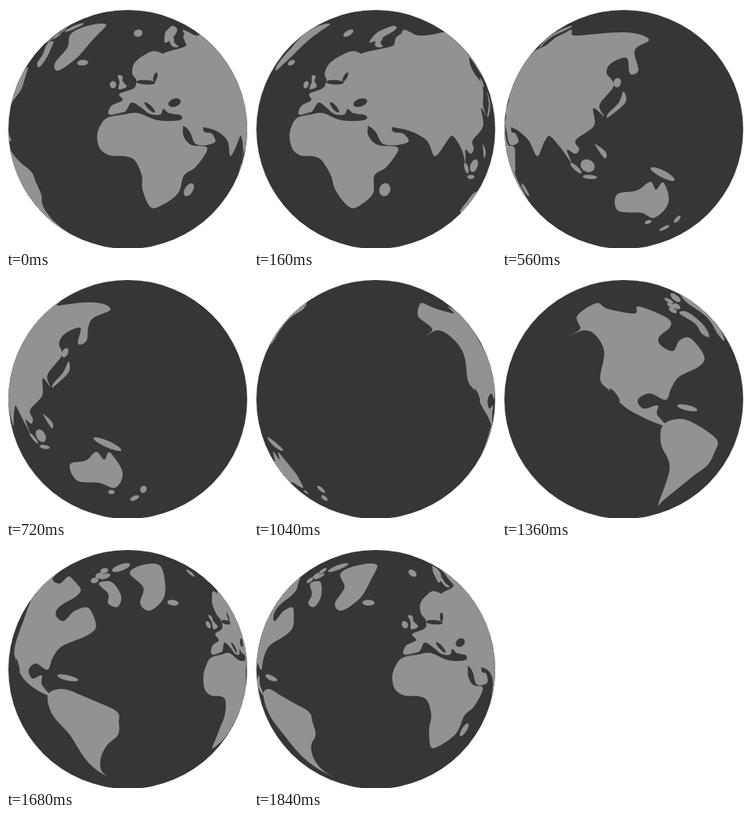
Write an HTML page with a canvas that moves like this. It is 303x303 px and loops after 1.92 s.

```html
<!DOCTYPE html>
<html>
<head>
<meta charset="utf-8">
<style>
html, body { margin: 0; width: 100%; height: 100%; overflow: hidden; background: #fff; }
canvas { display: block; width: 303px; height: 303px; }
</style>
</head>
<body>
<canvas id="stage"></canvas>
<script>
const SIZE = 303, CX = 152.5, CY = 154.5, R = 149.5;
const SEA = '#363636', LAND = '#929292';
const STEP = 80, STEPS = 24, RATE = 15.7, TURN = STEPS * RATE;
const DEG = Math.PI / 180;

const clamp = (v, lo, hi) => Math.max(lo, Math.min(hi, v));
const halfWidth = y => Math.sqrt(Math.max(0, R * R - (y - CY) ** 2));

// Longitude in front: steady turn that lags a little over the Pacific
const facing = step => RATE * step - 7.2 * clamp((step - 9) / 4, 0, 1);

// Closed smooth curve through x, y pairs
function smooth(p) {
  const n = p.length / 2, out = [];
  const at = (i, k) => p[((i + n) % n) * 2 + k];
  for (let i = 0; i < n; i++) {
    for (let t = 0; t < 1; t += 0.125) {
      out.push([0, 1].map(k => {
        const a = at(i - 1, k), b = at(i, k), c = at(i + 1, k), d = at(i + 2, k);
        return b + 0.5 * t * (c - a + t * (2 * a - 5 * b + 4 * c - d + t * (3 * (b - c) + d - a)));
      }));
    }
  }
  return out;
}

const shapes = [];

// Wraps a flat outline, as seen at the given step, onto the globe
function add(step, keys, fill = LAND) {
  const points = smooth(keys).map(([x, y]) => {
    const s = clamp((x - CX) / (halfWidth(y) || 1), -1, 1);
    return [facing(step) + Math.asin(s) / DEG, y];
  });
  shapes.push({ fill, points });
}

function blob(step, x, y, rx, ry, tilt = 0, fill = LAND) {
  const c = Math.cos(tilt * DEG), s = Math.sin(tilt * DEG), keys = [];
  for (let i = 0; i < 8; i++) {
    const u = rx * Math.cos(i * Math.PI / 4), v = ry * Math.sin(i * Math.PI / 4);
    keys.push(x + u * c - v * s, y + u * s + v * c);
  }
  add(step, keys, fill);
}

// Steps at which each region faces the viewer
const EUROPE = 0, ASIA = 5, OCEANIA = 9, AMERICA = 17, ATLANTIC = 21;

// Africa, Madagascar
add(EUROPE, [129, 139, 118, 150, 114, 164, 118, 179, 130, 187, 148, 188, 161, 193, 170, 212,
  171, 230, 180, 251, 192, 251, 215, 235, 223, 212, 238, 201, 252, 178, 232, 174, 222, 162,
  219, 141, 190, 138, 163, 132]);
blob(EUROPE, 229, 230, 5, 9, 32);

// Europe and Arabia
add(EUROPE, [130, 136, 132, 125, 146, 118, 142, 110, 160, 103, 163, 93, 158, 84, 162, 70,
  182, 57, 196, 60, 199, 69, 208, 70, 212, 57, 226, 52, 222, 38, 231, 34, 258, 64, 268, 100,
  247, 152, 258, 160, 261, 171, 238, 173, 222, 150, 160, 133]);
add(EUROPE, [140, 87, 146, 88, 146, 94, 151, 101, 141, 104, 142, 95]);
add(EUROPE, [205, 38, 210, 40, 211, 46, 216, 51, 209, 51, 205, 45]);
blob(EUROPE, 134, 98.5, 4, 4.5);
blob(EUROPE, 165.5, 34, 5.5, 4.5, -15);

// Mediterranean, Adriatic, Black Sea, Baltic
add(EUROPE, [127, 139, 148, 133, 157, 121, 169, 127, 180, 135, 193, 136, 197, 129, 204, 134,
  219, 137, 217, 143, 190, 143, 165, 134, 146, 136], SEA);
blob(EUROPE, 180, 127, 9, 2.5, 45, SEA);
blob(EUROPE, 211, 121, 8, 5, -20, SEA);
blob(EUROPE, 175, 95.5, 12, 2.8, 3, SEA);
blob(EUROPE, 187, 89, 2.4, 6, 15, SEA);

// Asia
add(ASIA, [46, 72, 58, 59, 95, 48, 121, 30, 136, 37, 200, 33, 228, 42, 222, 55, 235, 80,
  228, 85, 218, 65, 203, 72, 202, 84, 214, 100, 201, 124, 208, 138, 194, 128, 196, 150,
  172, 168, 176, 179, 170, 185, 159, 180, 163, 196, 152, 180, 135, 163, 126, 169, 111, 188,
  98, 169, 78, 157, 60, 152, 46, 148, 40, 110]);
add(ASIA, [72, 46, 90, 33, 114, 25, 115, 28, 94, 37]);
add(ASIA, [226, 107, 230, 121, 213, 139, 212, 135, 223, 121]);
add(ASIA, [197, 173, 209, 183, 207, 191, 201, 182]);
blob(ASIA, 217, 96, 4, 6, -15);
blob(ASIA, 184, 200, 9, 8);
blob(ASIA, 168, 203, 9, 3, 45);
blob(ASIA, 184, 214, 9, 2.6, 3);

// Oceania
add(OCEANIA, [80, 236, 100, 231, 113, 220, 123, 230, 130, 221, 146, 246, 137, 265, 117, 259,
  89, 256]);
blob(OCEANIA, 127, 210.5, 19, 4, 24);
blob(OCEANIA, 132, 270.5, 4, 2.5);
blob(OCEANIA, 161, 278, 6, 2.8, -25);
blob(OCEANIA, 172, 267, 4, 4.5, 20);

// North America, Cuba
add(AMERICA, [85, 74, 98, 66, 94, 50, 118, 34, 132, 41, 166, 47, 171, 38, 206, 52, 211, 63,
  197, 76, 198, 86, 214, 94, 222, 81, 236, 78, 253, 100, 247, 113, 222, 126, 212, 140,
  205, 155, 185, 147, 170, 155, 177, 166, 195, 162, 194, 173, 204, 188, 158, 167, 134, 143,
  123, 129, 128, 95, 117, 74, 103, 68]);
blob(AMERICA, 141, 149, 10, 2.4, 52, SEA);
blob(AMERICA, 232, 165, 13, 3.4, 13);

// South America
add(AMERICA, [202, 186, 224, 179, 245, 187, 269, 205, 266, 221, 257, 237, 240, 250, 203, 280,
  196, 285, 210, 240, 199, 210]);

// Greenland, Baffin and the Arctic islands
add(ATLANTIC, [155, 34, 170, 24, 192, 24, 199, 45, 197, 66, 180, 81, 168, 72, 172, 52]);
add(ATLANTIC, [116, 47, 132, 45, 144, 62, 140, 76, 128, 72, 128, 60]);
blob(ATLANTIC, 209, 71, 7, 3.5, 8);
blob(ATLANTIC, 144, 27, 12, 4, -20);
blob(ATLANTIC, 124, 38, 7, 3, -20);
for (let i = 0; i < 3; i++) blob(ATLANTIC, 111 + 6 * i, 43 - 6 * i, 5, 3.4, -15);

const canvas = document.getElementById('stage');
const ctx = canvas.getContext('2d');
const ratio = window.devicePixelRatio || 1;
canvas.width = canvas.height = Math.round(SIZE * ratio);

function drawShape({ points, fill }, view) {
  const rel = points.map(p => p[0] - view);
  if (rel.every(a => a >= 90) || rel.every(a => a <= -90)) return;
  ctx.beginPath();
  points.forEach(([, y], i) => {
    ctx.lineTo(CX + halfWidth(y) * Math.sin(clamp(rel[i], -90, 90) * DEG), y);
  });
  ctx.fillStyle = fill;
  ctx.fill();
}

function draw(step) {
  ctx.setTransform(ratio, 0, 0, ratio, 0, 0);
  ctx.fillStyle = '#fff';
  ctx.fillRect(0, 0, SIZE, SIZE);
  ctx.save();
  ctx.beginPath();
  ctx.arc(CX, CY, R, 0, 2 * Math.PI);
  ctx.fillStyle = SEA;
  ctx.fill();
  ctx.clip();
  for (const turn of [-TURN, 0, TURN]) {
    for (const shape of shapes) drawShape(shape, facing(step) + turn);
  }
  ctx.restore();
}

const start = performance.now();
function tick(now) {
  draw(Math.floor(Math.max(0, now - start) / STEP) % STEPS);
  requestAnimationFrame(tick);
}
draw(0);
requestAnimationFrame(tick);
</script>
</body>
</html>
```
